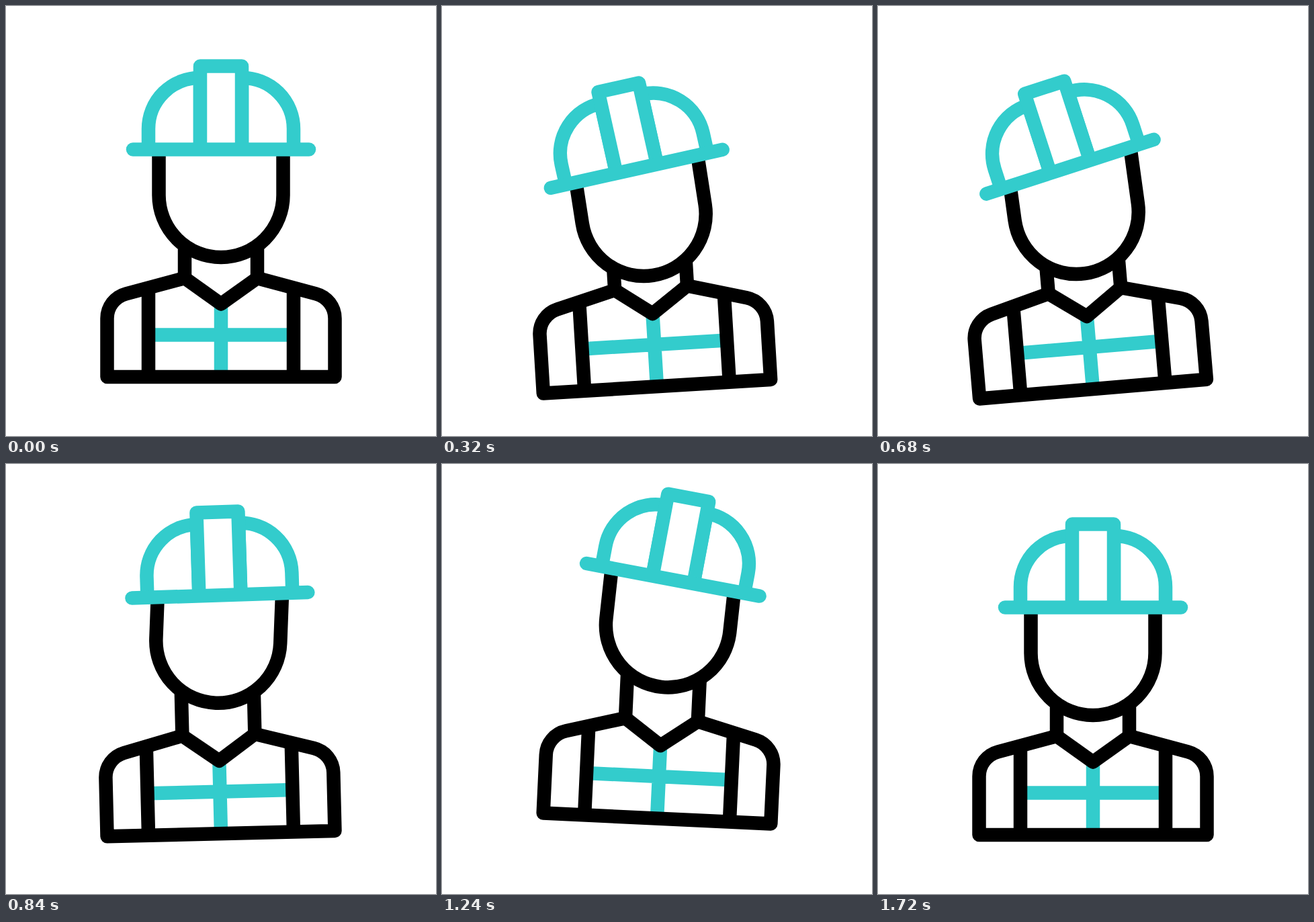
Recreate the animation shown at these times as an HTML page. Size 640 by 640 pixels, loop 1800 ms.

```html
<!DOCTYPE html>
<html lang="en">
<head>
<meta charset="utf-8">
<title>Worker</title>
<style>
  html, body { margin: 0; height: 100%; overflow: hidden; background: #fff; }
  svg { display: block; width: 100vw; height: 100vh; }
  path { stroke: #000; stroke-width: 20.5; stroke-linejoin: round; fill: none; }
  .teal { stroke: #33cccc; }
  .solid { fill: #fff; }
  .round { stroke-linecap: round; }
</style>
</head>
<body>
<svg viewBox="0 0 640 640">
  <g id="body">
    <path class="teal" d="M212 489.5H428M320 443V552"/>
    <path d="M266 405V325M374 405V325M212 420V552M428 420V552"/>
    <path d="M320 443.5L266 405L178.7 428.3A38 38 0 0 0 150.5 465V552H489.5V465A38 38 0 0 0 461.3 428.3L374 405Z"/>
    <g id="head">
      <path class="solid" d="M227.5 195V281.5A92.5 92.5 0 0 0 412.5 281.5V195"/>
      <g id="hat">
        <path class="teal solid" d="M212 213V183A76 76 0 0 1 289 107V213M428 213V183A76 76 0 0 0 351 107V213"/>
        <path class="teal solid" d="M289 213V89.5H351V213"/>
        <path class="teal round" d="M189 213.5H451"/>
      </g>
    </g>
  </g>
</svg>
<script>
  const LOOP = 1800, STEP = 40;
  const BEATS = [40, 550, 1120, 1725];

  const smooth = p => p * p * (3 - 2 * p);
  const clamp = p => Math.min(1, Math.max(0, p));

  // Sink to low, rise to high, return to rest: one eased move per beat.
  // Without a span, a move fills its whole beat.
  function swing(time, low, high, delay = 0, span) {
    return [low, high, 0].reduce((value, target, i) => {
      const length = span || BEATS[i + 1] - BEATS[i];
      const p = clamp((time - BEATS[i] - delay) / length);
      return value + (target - value) * smooth(p);
    }, 0);
  }

  function pose(id, drop, turn, pivotY) {
    document.getElementById(id).setAttribute('transform',
      `translate(0 ${drop}) rotate(${turn} 320 ${pivotY})`);
  }

  function draw() {
    let time = Math.floor(performance.now() % LOOP / STEP) * STEP;
    if (time >= 1720) time = 0;
    // The head leads the body, the hat trails behind.
    pose('body', swing(time, 25, -27.3), swing(time, -6.05, 3), 552);
    pose('head', swing(time, 15.8, -22.8, 0, 390), swing(time, -6.2, 4.8, 0, 365), 327);
    pose('hat', 0, swing(time, -10.1, 4.4, 152, 310), 213.5);
    requestAnimationFrame(draw);
  }
  draw();
</script>
</body>
</html>
```
